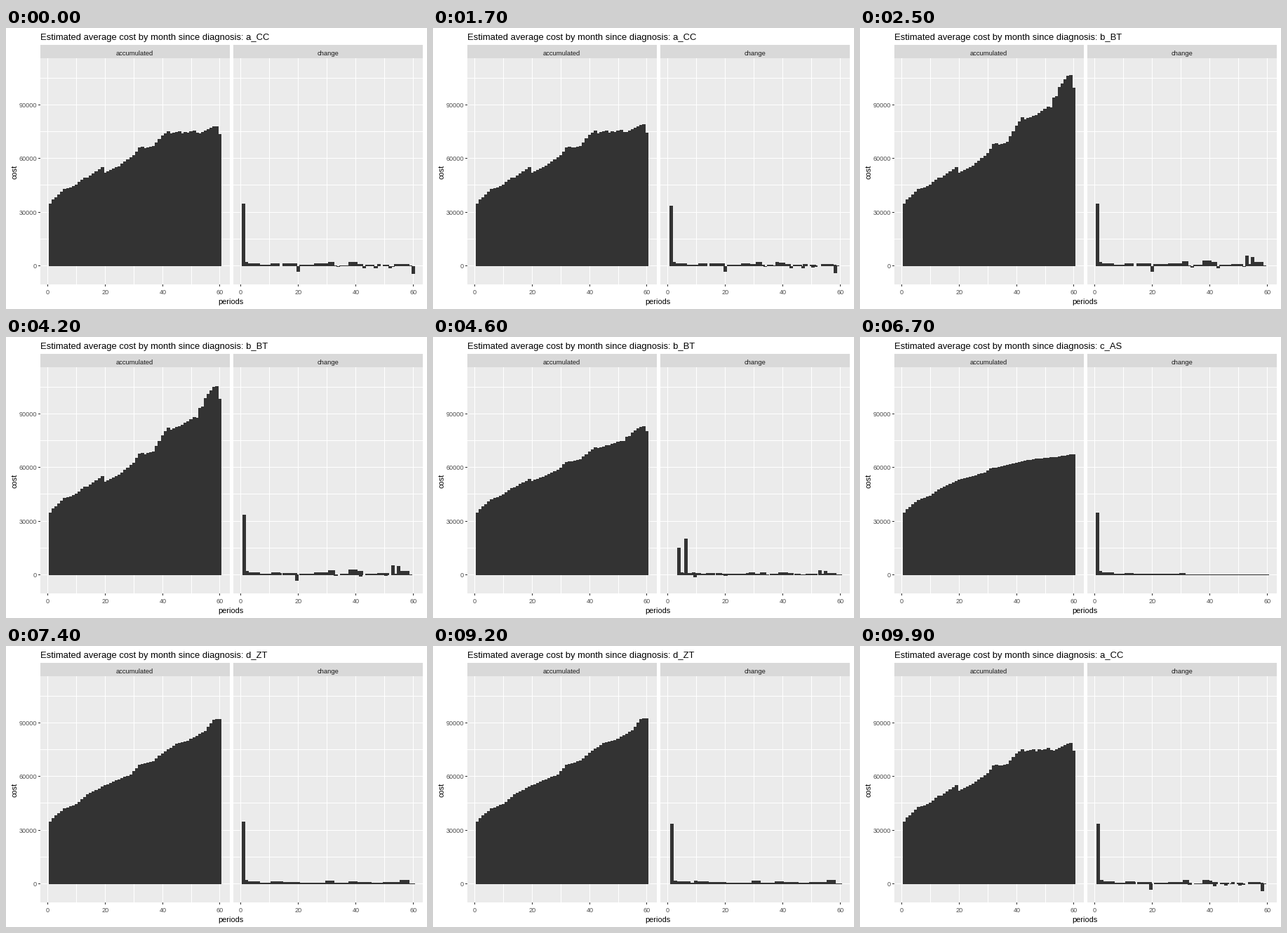
These frames come from a looping animation (600 by 400 pixels, 10 s). A matplotlib script:

```python
import math

import matplotlib.pyplot as plt
import numpy as np
from matplotlib.animation import FuncAnimation
from matplotlib.collections import PolyCollection
from matplotlib.patches import Rectangle

W, H, DPI = 600, 400, 100
FRAMES, INTERVAL = 100, 100
CYCLE, HOLD, STEPS = 25, 17, 9          # frames per state, still part, moving part

PANELS = {"accumulated": 49.24, "change": 324.5}
PANEL_W, TOP, STRIP_TOP, BOTTOM = 270, 43, 24, 365
X_UNIT = PANEL_W / 66
ZERO_Y, Y_UNIT = 338.52, 76.35 / 30000
BAR = "#333333"
MONTHS = np.arange(1, 61)

# Turning points of the accumulated cost: (month, hundreds)
EARLY = [(1, 348), (2, 370), (6, 430), (8, 439), (10, 454), (13, 495),
         (14, 493), (19, 553), (20, 520)]
CURVES = {
    "a_CC": EARLY + [(25, 558), (30, 618), (32, 662), (33, 666), (34, 660),
                     (37, 670), (40, 730), (42, 753), (43, 740), (46, 753),
                     (47, 741), (48, 749), (49, 746), (51, 757), (52, 745),
                     (53, 741), (58, 781), (59, 782), (60, 738)],
    "b_BT": EARLY + [(25, 560), (30, 630), (32, 682), (33, 685), (34, 677),
                     (37, 693), (40, 784), (42, 831), (43, 819), (47, 844),
                     (51, 890), (52, 886), (53, 942), (54, 950), (55, 1000),
                     (58, 1063), (59, 1067), (60, 995)],
    "c_AS": [(1, 348), (2, 368), (6, 418), (10, 444), (13, 479), (20, 530),
             (29, 570), (31, 592), (41, 627), (46, 643), (55, 655), (60, 667)],
    "d_ZT": [(1, 348), (2, 368), (6, 422), (10, 446), (14, 500), (20, 552),
             (29, 612), (32, 667), (37, 689), (40, 733), (45, 788), (49, 806),
             (55, 862), (58, 926), (60, 930)],
}
NAMES = list(CURVES)


def bars(values):
    """Rows of (x, low, high) with the negative bars first."""
    order = np.argsort(values >= 0, kind="stable")
    x, v = MONTHS[order], values[order]
    return np.column_stack([x, np.minimum(v, 0), np.maximum(v, 0)])


def state(points):
    total = np.interp(MONTHS, *zip(*points)) * 100
    change = np.diff(total, prepend=0)
    change[change < -5000] = 0          # below the axis limit
    return {"accumulated": bars(total), "change": bars(change)}


STATES = [state(p) for p in CURVES.values()]


def px(x, left):
    return left + (x + 2.5) * X_UNIT


def py(y):
    return ZERO_Y - y * Y_UNIT


def quads(rows, left):
    out = []
    for x, low, high in rows:
        x0, x1 = math.floor(px(x - 0.5, left)), math.floor(px(x + 0.5, left)) + 1
        y0, y1 = round(py(high)), round(py(low))
        if y1 > y0:
            out.append([(x0, y0), (x1, y0), (x1, y1), (x0, y1)])
    return out


fig = plt.figure(figsize=(W / DPI, H / DPI), dpi=DPI, facecolor="white")
ax = fig.add_axes([0, 0, 1, 1])
ax.set_xlim(0, W)
ax.set_ylim(H, 0)
ax.axis("off")


def box(x, y, w, h, color):
    ax.add_patch(Rectangle((x, y), w, h, fc=color, lw=0, antialiased=False))


def label(x, y, text, size, color="black", ha="center", **kw):
    return ax.text(x, y, text, fontsize=size * 72 / DPI, color=color, ha=ha,
                   va="baseline", family="Liberation Sans", **kw)


shapes = {}
for name, left in PANELS.items():
    edge = math.floor(left)
    box(edge, STRIP_TOP, PANEL_W, TOP - STRIP_TOP, "#D9D9D9")
    box(edge, TOP, PANEL_W, BOTTOM - TOP, "#EBEBEB")
    label(left + PANEL_W / 2 - 0.7, 39, name, 9.35, "#1A1A1A")
    for y in range(0, 105001, 15000):
        box(edge, math.floor(py(y)), PANEL_W, 1, "white")
    for x in range(0, 61, 10):
        col = math.floor(px(x, left))
        box(col, TOP, 1, BOTTOM - TOP, "white")
        if x % 20 == 0:
            box(col, BOTTOM, 1, 3, BAR)
            label(col + 0.5, 379, str(x), 9.2, "#4D4D4D")
    shapes[name] = PolyCollection([], facecolors=BAR, linewidths=0,
                                  antialiaseds=False, zorder=2)
    ax.add_collection(shapes[name])

for y in range(0, 90001, 30000):
    row = math.floor(py(y))
    box(46, row, 3, 1, BAR)
    label(44, row + 4, str(y), 9.2, "#4D4D4D", ha="right")

label(320.5, 393, "periods", 11)
label(15, 205, "cost", 11, rotation=90, rotation_mode="anchor")
title = label(49, 17, "", 13, ha="left")


def draw(frame):
    i, k = divmod(frame, CYCLE)
    nxt = (i + 1) % len(STATES)
    step = max(0, k - HOLD + 1)
    ease = (1 - math.cos(math.pi * step / STEPS)) / 2
    for name, left in PANELS.items():
        start, end = STATES[i][name], STATES[nxt][name]
        shapes[name].set_verts(quads(start + (end - start) * ease, left))
    current = NAMES[nxt if step > STEPS / 2 + 1 else i]
    title.set_text("Estimated average cost by month since diagnosis: " + current)
    return [*shapes.values(), title]


anim = FuncAnimation(fig, draw, frames=FRAMES, interval=INTERVAL,
                     init_func=lambda: draw(0), repeat=True, repeat_delay=0)
plt.show()
```
